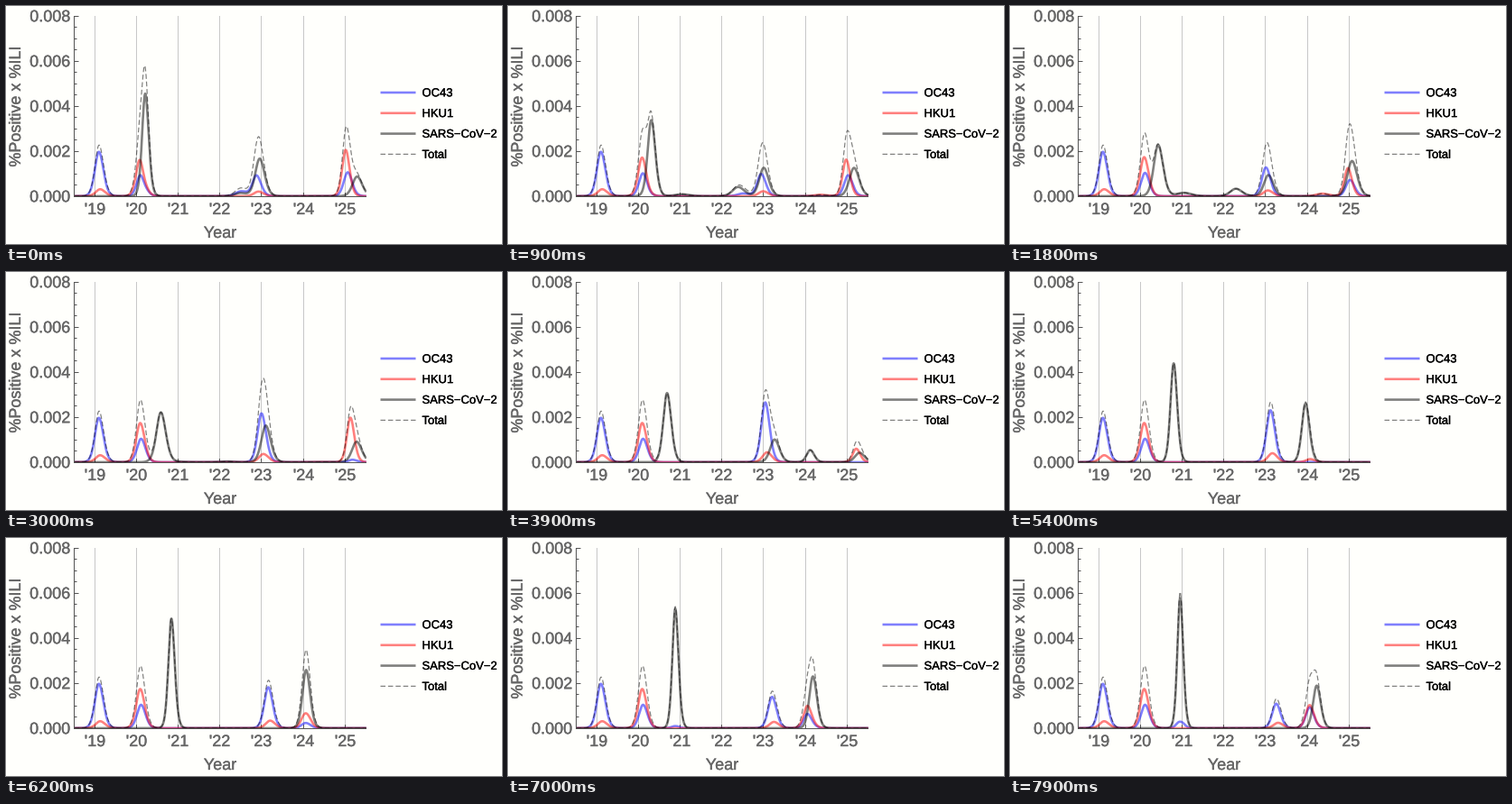
A matplotlib script that plays this animation: 549 px wide and 264 px high, repeating every 8000 ms.

```python
import numpy as np
import matplotlib.pyplot as plt
from matplotlib import patheffects
from matplotlib.animation import FuncAnimation

W, H, FRAMES, STEP = 549, 264, 80, 100
LEFT, RIGHT, TOP, BASE = 75.5, 399, 11, 211
PER_YEAR, PER_UNIT = 46.17, 25
GRAY, AXIS = "#666666", "#555555"

plt.rcParams["font.family"] = "Liberation Sans"

years = np.linspace(18.5, 25.5, 900)


def x_of(year):
    return 75.6 + (year - 18.5) * PER_YEAR


def y_of(value):
    return BASE - value * PER_UNIT


def ramp(u, start, end):
    s = np.clip((u - start) / (end - start), 0, 1)
    return s * s * (3 - 2 * s)


def bell(u, mid, spread):
    return np.exp(-0.5 * ((u - mid) / spread) ** 2)


def wave(mid, height, spread=0.1):
    """Epidemic curve: falls a little more slowly than it rises."""
    d = years - mid
    width = 1.946 * spread * np.where(d > 0, 1.06, 0.96)
    return height * np.cosh(d / width) ** -4


def epidemics(u):
    """Incidence (x 0.001) of the three viruses at progress u of the loop."""
    shift = bell(u, 0.2, 0.08)  # years in which a small 2022 wave delays the next

    # The first SARS wave comes later and later; season sets its size.
    first = 20.2 + 0.75 * u + 0.11 * np.sin(np.pi * u) ** 2
    size = 3.95 - 1.95 * np.cos(2 * np.pi * (first - 0.5))
    sars = (
        wave(first, size, 0.165 / np.sqrt(size))
        + wave(21.03, 0.16 * shift, 0.17)
        + wave(22.48 - 0.9 * u, 0.44 * bell(u, 0.15, 0.1), 0.14)
        + wave(22.94 + 2.7 * u ** 3 + 0.09 * shift,
               (1.7 - 0.8 * shift) * (1 - ramp(u, 0.4, 0.6)), 0.11)
        + wave(24.22 - 0.28 * bell(u, 0.65, 0.12),
               2.6 * ramp(u, 0.42, 0.65) - 0.8 * ramp(u, 0.75, 1.05), 0.09)
        + wave(25.29 - 0.24 * shift,
               (0.84 + 0.76 * shift) * (1 - ramp(u, 0.375, 0.6)), 0.115)
    )

    mid23 = 22.87 + 0.38 * u ** 1.2 + 0.07 * shift
    size23 = 0.9 + 1.8 * bell(u, 0.52, 0.22) - 0.3 * shift
    mid25 = 25.01 + 0.85 * u ** 2 - 0.09 * shift
    oc43 = (
        wave(19.09, 1.97)
        + wave(20.1, 1.04)
        + wave(first, 0.43 * ramp(u, 0.8, 1), 0.08)
        + wave(22.5, 0.22 * (1 - ramp(u, 0, 0.25)), 0.14)
        + wave(mid23, size23)
        + wave(24.05, 0.95 * ramp(u, 0.65, 1))
        + wave(mid25 + 0.05, 1.08 * (1 - ramp(u, 0.18, 0.43)) - 0.2 * shift)
    )
    hku1 = (
        wave(19.12, 0.31, 0.11)
        + wave(20.08, 1.74)
        + wave(mid23 + 0.045, 0.1 + 0.13 * size23, 0.11)
        + wave(24.35, 0.12 * shift, 0.15)
        + wave(24.05, 1.05 * ramp(u, 0.62, 0.85))
        + wave(mid25, (2.1 - 0.8 * shift) * (1 - ramp(u, 0.375, 0.55)), 0.088)
    )
    rivalry = np.exp(-sars / 15)
    return oc43 * rivalry, hku1 * rivalry, sars


fig = plt.figure(figsize=(W / 72, H / 72), dpi=72, facecolor="#fffffc")
ax = fig.add_axes([0, 0, 1, 1])
ax.set(xlim=(0, W), ylim=(H, 0))
ax.axis("off")


def rule(x0, y0, x1, y1, color=AXIS):
    ax.plot([x0, x1], [y0, y1], color=color, lw=1, snap=False,
            solid_capstyle="butt")


def label(x, y, text, size=18, color=GRAY, ha="center", **style):
    bolder = [patheffects.withStroke(linewidth=0.35, foreground=color)]
    ax.text(x, y, text, size=size, color=color, ha=ha, va="baseline",
            path_effects=bolder, **style)


for year in range(19, 26):
    x = int(x_of(year) - 0.5) + 0.5
    rule(x, TOP, x, BASE, "#c8c8c8")
    rule(x, BASE - 4, x, BASE)
    label(x, 231, f"'{year}")

rule(LEFT, TOP, LEFT, BASE + 1)
rule(LEFT, BASE + 0.5, RIGHT, BASE + 0.5)
for i in range(17):
    y = int(y_of(i / 2)) + 0.5
    major = i % 4 == 0
    rule(LEFT, y, LEFT + (5 if major else 3), y)
    if major:
        label(71.5, y + 5.7, f"{i / 2000:.3f}", ha="right")

label(237, 257, "Year")
label(16, 111.5, "%Positive x %ILI", rotation=90, rotation_mode="anchor")

STYLES = [
    ("OC43", dict(color="blue", lw=2.6)),
    ("HKU1", dict(color="red", lw=2.6)),
    ("SARS\u2212CoV\u22122", dict(color="black", lw=2.6)),
    ("Total", dict(color="black", lw=1.2, dashes=(4.6, 2.4), dash_capstyle="butt")),
]
lines = []
for i, (name, style) in enumerate(STYLES):
    style.update(alpha=0.5, solid_capstyle="butt", snap=False)
    y = 96 + 22.8 * i
    ax.plot([414.5, 453.5], [y, y], **style)
    label(460.5, y + 4.3, name, size=13, color="black", ha="left")
    line, = ax.plot(x_of(years), np.full_like(years, BASE), **style)
    line.set_clip_path(plt.Rectangle((LEFT, BASE), RIGHT - LEFT, TOP - BASE,
                                     transform=ax.transData))
    lines.append(line)


def update(frame):
    parts = epidemics(frame / FRAMES)
    for line, values in zip(lines, (*parts, sum(parts))):
        line.set_ydata(y_of(values))
    return lines


anim = FuncAnimation(fig, update, frames=FRAMES, interval=STEP,
                     repeat=True, repeat_delay=0, blit=False)
plt.show()
```
